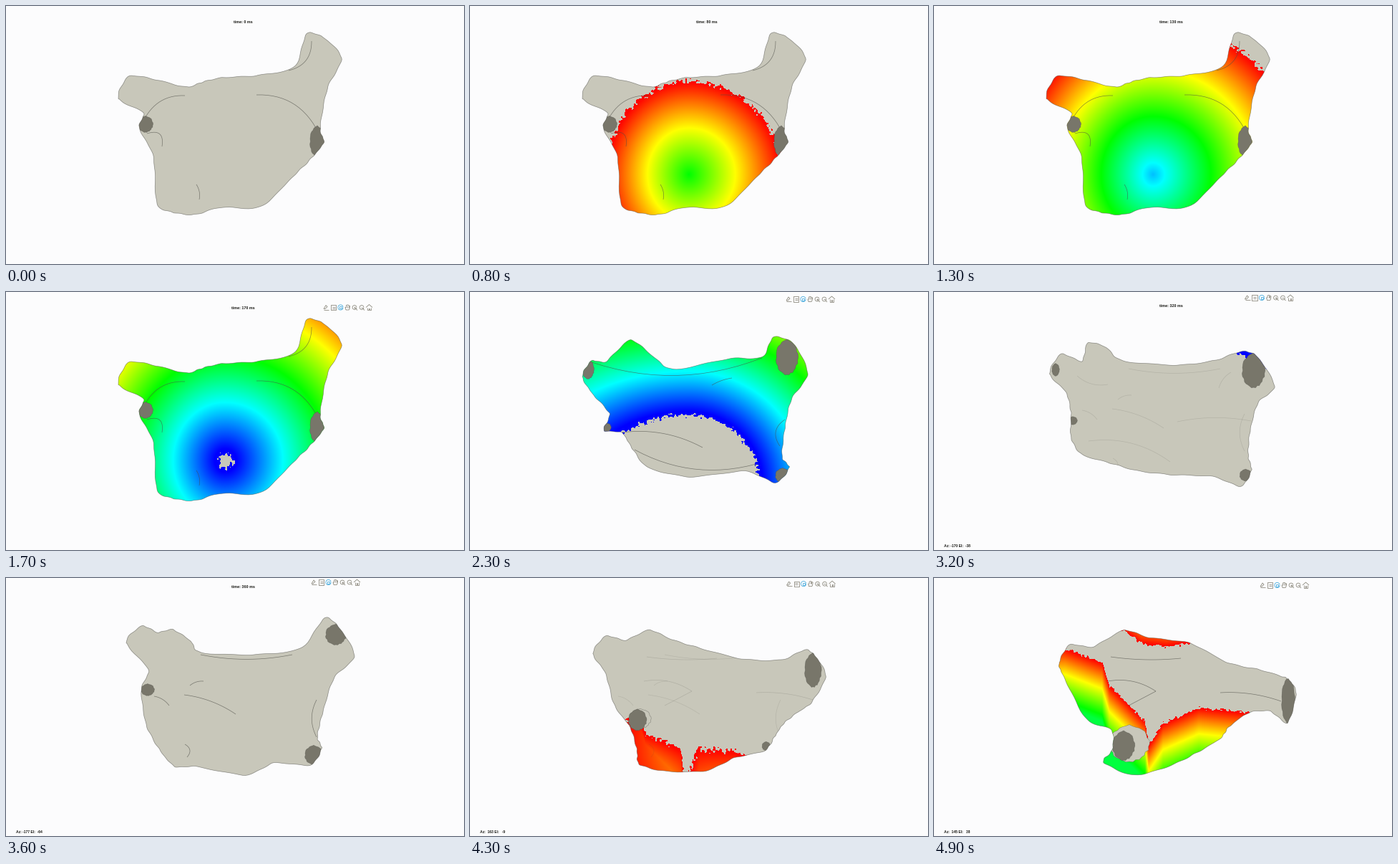
Recreate the animation shown at these times as a matplotlib script. Size 640 by 360 pixels, loop 5000 ms.

```python
import numpy as np
import matplotlib.pyplot as plt
from matplotlib.animation import FuncAnimation
from matplotlib.collections import LineCollection
from matplotlib.patches import Polygon

W, H, FRAMES, STEP = 640, 360, 50, 100
PX = 0.72  # points per pixel at 100 dpi
BG, TISSUE, INSIDE, INK = "#fcfcfd", "#c8c7ba", "#78766a", "#1c1c18"
TOOL, ACTIVE = "#89867a", "#45aadd"
AGE_END = 164  # ms after activation when tissue turns grey again
BEAT = 400     # ms between activations

rng = np.random.default_rng(4)
yy, xx = np.mgrid[0:H, 0:W] + 0.5
turn = np.linspace(0, 2 * np.pi, 37)[:-1]
ragged = 1 + 0.06 * rng.uniform(-1, 1, turn.size)


def spline(points, n=12, tension=0.38):
    """Closed cardinal spline with a slightly uneven edge."""
    p = np.array(points, float)
    nxt = np.roll(p, -1, 0)
    m = tension * (nxt - np.roll(p, 1, 0))
    t = np.linspace(0, 1, n, endpoint=False)[:, None, None]
    curve = ((2 * t**3 - 3 * t**2 + 1) * p + (t**3 - 2 * t**2 + t) * m
             + (3 * t**2 - 2 * t**3) * nxt + (t**3 - t**2) * np.roll(m, -1, 0))
    curve = curve.swapaxes(0, 1).reshape(-1, 2)
    k = np.arange(len(curve))
    return curve + 0.5 * np.column_stack([np.sin(1.1 * k), np.cos(0.8 * k)])


def oval(cx, cy, rx, ry):
    return np.column_stack([cx + rx * ragged * np.cos(turn), cy + ry * ragged * np.sin(turn)])


def fold(x0, y0, x1, y1, bulge):
    t = np.linspace(0, 1, 15)
    bow = 4 * bulge * t * (1 - t)
    return np.column_stack([x0 + (x1 - x0) * t - (y1 - y0) * bow,
                            y0 + (y1 - y0) * t + (x1 - x0) * bow])


def spread(cx, cy, left, right):
    """Distance from a point, stretched differently to either side."""
    dx = xx - cx
    return np.hypot(np.where(dx < 0, left, right) * dx, yy - cy)


def crest(*points):
    """Depth below a line through a few points."""
    return yy - np.interp(xx, *zip(*points))


def pose(shape, holes, folds, times):
    return dict(shape=spline(shape), holes=[oval(*h) for h in holes],
                folds=[fold(*f) for f in folds], times=np.maximum(times, 0))


# Outline landmarks run clockwise from the left vein and correspond between poses.
# Holes: left tube, lower left, upper left, upper right, lower right vein.
front = pose(
    [(157, 129), (172, 98), (210, 103), (252, 113), (275, 106), (302, 100), (350, 97), (403, 85),
     (420, 39), (445, 45), (469, 73), (449, 115), (439, 170), (444, 190), (428, 211), (402, 237),
     (356, 280), (300, 281), (264, 291), (234, 288), (211, 276), (206, 210), (186, 170),
     (192, 149)],
    [(194, 165, 0, 0), (195, 165, 10, 11), (160, 125, 0, 0), (423, 46, 0, 0), (435, 189, 10, 21)],
    [(195, 155, 250, 125, -.15), (350, 124, 433, 170, -.15), (395, 90, 427, 49, .2),
     (197, 178, 218, 196, -.4), (266, 249, 270, 270, -.1)],
    spread(306, 235, 1.12, 1) / 1.62)

tilted = pose(
    [(157, 118), (170, 96), (190, 97), (224, 67), (256, 90), (285, 108), (362, 93), (408, 91),
     (424, 63), (452, 72), (472, 114), (449, 150), (440, 190), (436, 230), (446, 245), (427, 266),
     (385, 250), (308, 258), (249, 245), (226, 217), (212, 196), (187, 193), (195, 170),
     (172, 143)],
    [(192, 189, 0, 0), (191, 189, 6, 6), (165, 108, 8, 13), (443, 91, 15, 24), (437, 256, 10, 10)],
    [(170, 98, 408, 92, .09), (212, 196, 325, 217, -.08), (230, 220, 400, 240, .1),
     (440, 178, 433, 215, .25), (338, 130, 366, 120, -.05)],
    66 + 0.72 * (spread(305, 265, 0.67, 0.95) - 93))

level = pose(
    [(155, 138), (166, 106), (201, 117), (197, 70), (222, 66), (255, 88), (334, 97), (372, 93),
     (414, 110), (437, 110), (465, 154), (447, 170), (441, 200), (443, 235), (446, 260),
     (432, 281), (405, 257), (330, 235), (305, 236), (255, 214), (198, 213), (187, 201),
     (194, 183), (170, 152)],
    [(190, 203, 0, 0), (190, 203, 3, 3), (164, 122, 10, 17), (432, 140, 17, 33), (441, 264, 4, 3)],
    [(200, 117, 243, 129, .12), (340, 181, 443, 180, -.05), (216, 208, 330, 237, -.1),
     (398, 134, 415, 112, -.1)],
    116 - 0.9 * crest((164, 138), (199, 128), (201, 78), (222, 88), (243, 131), (345, 134),
                      (443, 184)))

below = pose(
    [(168, 90), (190, 67), (212, 76), (233, 72), (258, 88), (272, 104), (345, 107), (412, 98),
     (445, 56), (466, 70), (487, 109), (458, 140), (442, 190), (435, 222), (441, 238), (425, 261),
     (375, 258), (335, 275), (265, 263), (236, 263), (215, 240), (196, 205), (189, 155),
     (199, 128)],
    [(197, 156, 0, 0), (198, 156, 9, 8), (176, 95, 0, 0), (461, 79, 14, 14), (430, 247, 12, 13)],
    [(249, 163, 321, 190, -.06), (257, 150, 276, 144, -.1), (272, 107, 400, 107, .05),
     (434, 170, 434, 222, .13), (207, 165, 228, 178, -.1), (250, 232, 253, 250, -.3)],
    spread(310, 235, 1.12, 1) / 1.62)

behind = pose(
    [(175, 118), (190, 93), (222, 96), (265, 73), (300, 83), (358, 91), (410, 118), (455, 128),
     (488, 138), (497, 143), (506, 161), (494, 202), (470, 186), (440, 188), (412, 208),
     (400, 224), (365, 245), (325, 264), (278, 275), (237, 257), (249, 240), (248, 212),
     (213, 197), (181, 137)],
    [(273, 231, 27, 25), (265, 234, 15, 20), (178, 120, 0, 0), (495, 171, 9, 31),
     (400, 224, 0, 0)],
    [(247, 110, 345, 112, .03), (243, 144, 310, 158, -.1), (272, 178, 310, 158, 0),
     (400, 160, 485, 172, -.05)],
    90 - 1.1 * np.maximum(
        crest((183, 98), (235, 118), (245, 150), (295, 200), (300, 233), (320, 203), (370, 181),
              (440, 188), (460, 240)),
        -crest((262, 72), (290, 92), (325, 96), (358, 91))))

POSES = [front, tilted, level, below, behind]

# Waypoints: ms, pose, azimuth, elevation, toolbar x, toolbar y, title y
VIEWS = [(0, 0, -180, -88, 447, 21.5, 23),
         (1700, 0, -180, -88, 447, 21.5, 23),
         (2300, 1, -172, -42, 445, 10, -20),
         (2400, 1, -172, -42, 445, 10, -20),
         (2800, 2, -164, -13, 445, 10, 26),
         (3600, 3, -177, -64, 430, 6, 13),
         (4900, 4, -215, 38, 459, 10, -20)]

# Uneven wave front, about one mesh cell deep
jag = np.kron(rng.uniform(-3, 3, (H // 3, W // 3 + 1)), np.ones((3, 3)))[:, :W]
jag = (jag + np.roll(jag, 1, 0) + np.roll(jag, 1, 1) + np.roll(jag, (1, 1), (0, 1))) / 4


def ring(x, r):
    return np.column_stack([x + r * np.cos(turn), r * np.sin(turn)])


def box(x, r):
    return [(x - r, -r), (x + r, -r), (x + r, r), (x - r, r), (x - r, -r)]


def lens(x):
    return [ring(x, 2.9), [(x + 2, 2), (x + 4, 4)], [(x - 1.5, 0), (x + 1.5, 0)]]


grey_icons = [[(-3, 2), (0, -3), (2, -1), (-1, 2), (-3, 2)], [(-3, 3), (4, 3)],
              box(10.5, 3.6), [(8.5, -1), (12.5, -1)], [(8.5, 1), (12.5, 1)],
              [(28, 3.5), (27, 0), (28.5, 0), (28.5, -3), (30.5, -3.6), (33.5, -2), (33, 2),
               (32, 3.5), (28, 3.5)],
              [(30, -3), (30, 0)], [(31.7, -3), (31.7, 0)],
              *lens(40), [(40, -1.5), (40, 1.5)], *lens(50),
              [(56, 0), (60.5, -4), (65, 0)],
              [(57.7, 0), (57.7, 3.5), (60, 3.5), (60, 1), (61, 1), (61, 3.5), (63.3, 3.5),
               (63.3, 0)]]
blue_icons = [ring(20.5, 3.6), box(20.5, 1.5)]
icons = [np.array(line) for line in grey_icons + blue_icons]
icon_colors = [TOOL] * len(grey_icons) + [ACTIVE] * len(blue_icons)

fig = plt.figure(figsize=(W / 100, H / 100), dpi=100, facecolor=BG)
ax = fig.add_axes([0, 0, 1, 1])
ax.set(xlim=(0, W), ylim=(H, 0))
ax.axis("off")

image = ax.imshow(np.ones((H, W, 3)), extent=(0, W, H, 0), aspect="auto",
                  interpolation="nearest", zorder=1)
body = Polygon(front["shape"], fc="none", ec=(.3, .3, .28, .6), lw=0.7 * PX, zorder=5)
ax.add_patch(body)
holes = [ax.add_patch(Polygon(h, fc=INSIDE if k else TISSUE, ec=(.3, .3, .28, .5),
                              lw=0.6 * PX, zorder=4 + k / 10))
         for k, h in enumerate(front["holes"])]
folds = [ax.add_collection(LineCollection(p["folds"], colors="#4a4a44", linewidths=0.7 * PX,
                                          zorder=3)) for p in POSES]
toolbar = ax.add_collection(LineCollection([], colors=icon_colors, linewidths=0.8 * PX, zorder=6))
label = dict(weight="bold", color=INK, va="center", family="Liberation Sans")
title = ax.text(331, 23, "", size=5.4 * PX, ha="center", **label)
angles = ax.text(14, 354, "", size=5 * PX, **label)


def paint(times, clock):
    """Colour by time since activation: red, yellow, green, cyan, blue."""
    age = (clock - BEAT if clock >= BEAT else clock) - times
    hue = np.clip(age, 0, 160) / 40
    rgb = np.stack([np.clip(2 - hue, 0, 1),
                    np.clip(np.minimum(hue, 4 - hue), 0, 1),
                    np.clip(hue - 2, 0, 1)], axis=-1)
    rough = age + jag
    rgb[(rough <= 0) | (rough >= AGE_END) | (clock == 0)] = plt.matplotlib.colors.to_rgb(TISSUE)
    return rgb


def draw(frame):
    ms = frame * STEP
    k = max(i for i, v in enumerate(VIEWS[:-1]) if v[0] <= ms)
    start, end = np.array(VIEWS[k]), np.array(VIEWS[k + 1])
    u = (ms - start[0]) / (end[0] - start[0])
    a, b = POSES[VIEWS[k][1]], POSES[VIEWS[k + 1][1]]

    def mix(p, q):
        return (1 - u) * p + u * q

    _, _, az, el, tool_x, tool_y, title_y = mix(start, end)
    body.set_xy(mix(a["shape"], b["shape"]))
    image.set_data(paint(mix(a["times"], b["times"]), ms // 10))
    for hole, p, q in zip(holes, a["holes"], b["holes"]):
        hole.set_xy(mix(p, q))
        hole.set_visible(bool(np.ptp(hole.get_xy()) > 0 and np.ptp(hole.get_xy()[:, 0]) > 1))
    for p, lines in zip(POSES, folds):
        lines.set_alpha(0.65 * mix(float(p is a), float(p is b)) ** 2)
    for artist in (image, *holes, *folds):
        artist.set_clip_path(body)

    title.set_text(f"time: {ms // 10} ms")
    title.set_y(title_y)
    title.set_visible(not 1800 < ms < 2500)
    angles.set_text(f"Az: {(round(az) + 180) % 360 - 180:4d} El: {round(el):4d}")
    angles.set_visible(ms >= 1800 and ms not in (2300, 2400))
    toolbar.set_segments([line + (tool_x, tool_y) for line in icons])
    toolbar.set_visible(ms >= 1500)
    return [image, body, *holes, *folds, toolbar, title, angles]


anim = FuncAnimation(fig, draw, frames=FRAMES, interval=STEP, repeat=True, repeat_delay=0,
                     init_func=lambda: draw(0), blit=False)
plt.show()
```
